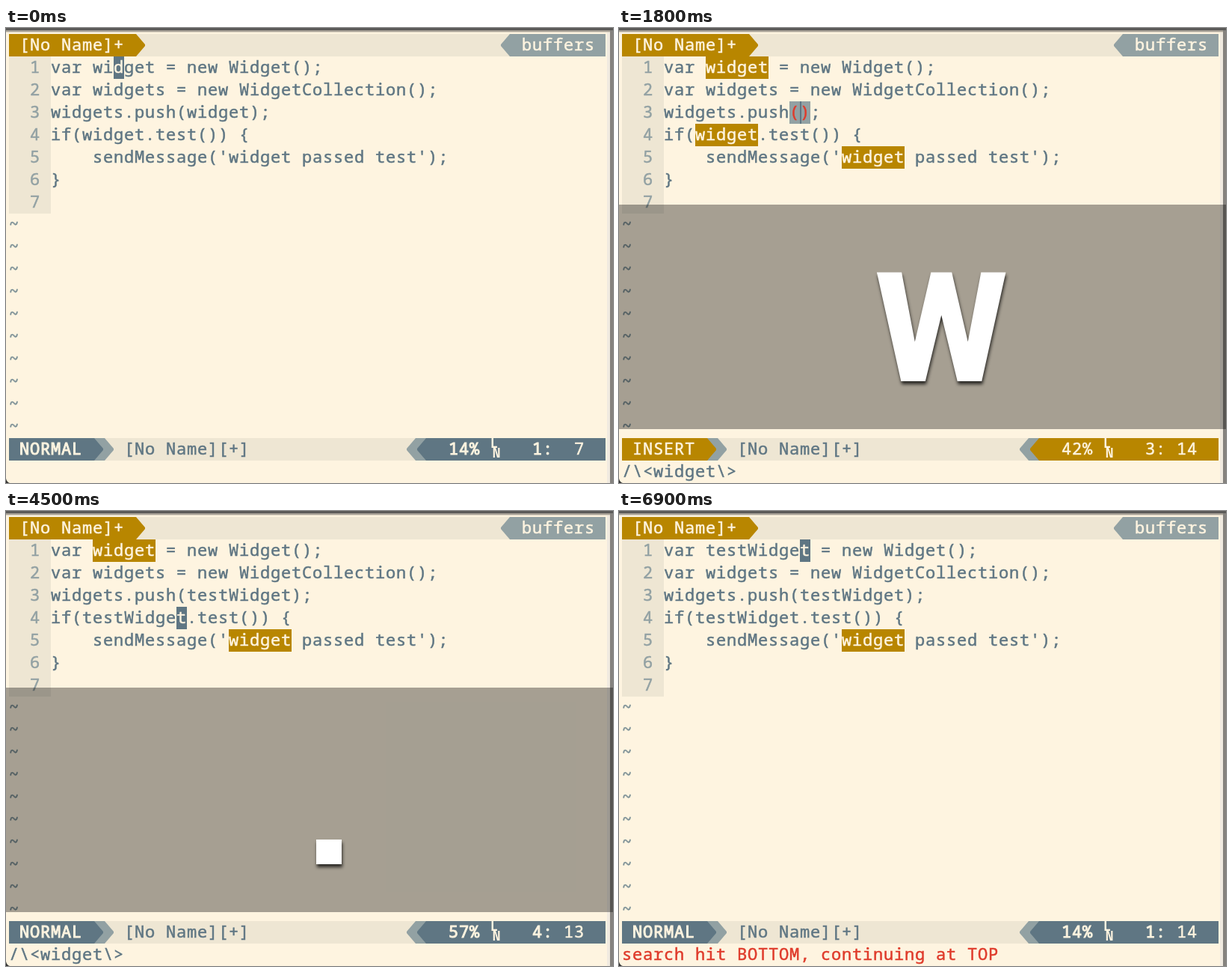
Recreate the animation shown at these times as an HTML page. Size 812 by 608 pixels, loop 7.2 s.

```html
<!DOCTYPE html>
<html lang="en">
<head>
<meta charset="utf-8">
<title>Search and repeat</title>
<style>
  html, body { margin: 0; width: 100%; height: 100%; overflow: hidden; background: #fef4e0; }
  svg { display: block; width: 812px; height: 608px; }
  text { white-space: pre; }
  .cell { font: 22px "Noto Sans Mono", "DejaVu Sans Mono", monospace; letter-spacing: .8px; stroke-width: .5px; }
  .bold { stroke-width: 1px; }
  .small { font: bold 17px "Noto Sans Mono", monospace; }
  .keys { filter: drop-shadow(1px 4px 2px rgba(0, 0, 0, .75)); fill: #fff; }
  .keys text {
    font: bold 199px Roboto, "DejaVu Sans", sans-serif; letter-spacing: 6px;
    text-anchor: middle; stroke: #fff; stroke-width: 4px;
  }
</style>
</head>
<body>
<svg id="stage" viewBox="0 0 812 608"></svg>
<script>
const BG = '#fef4e0', PALE = '#eee6d3', INK = '#5f7683', GRAY = '#92a1a3', GOLD = '#b88600', RED = '#df3b2b';
const LOOP = 7200, CELL = 14, ROW = 30, LEFT = 4, TOP = 8, CODE = 4;
const FIND = '/\\<widget\\>', WRAP = 'search hit BOTTOM, continuing at TOP';
const OLD = 'widget', NEW = 'testWidget';

// start ms, names on lines 1, 3 and 4, cursor line, column, insert mode, message, keys
const steps = [
  [0,    OLD, OLD, OLD, 1, 7, 0, '', ''],
  [300,  OLD, OLD, OLD, 1, 7, 0, '', '⇧8'],
  [600,  OLD, OLD, OLD, 3, 14, 0, FIND, '⇧8'],
  [1500, OLD, '', OLD, 3, 14, 1, FIND, 'W'],
  [2400, OLD, 'te', OLD, 3, 16, 1, FIND, 'TE'],
  [2700, OLD, 'test', OLD, 3, 18, 1, FIND, 'ST'],
  [3000, OLD, 'testWid', OLD, 3, 21, 1, FIND, 'ID'],
  [3300, OLD, NEW, OLD, 3, 24, 1, FIND, 'ET'],
  [3900, OLD, NEW, OLD, 3, 23, 0, FIND, '⎋'],
  [4200, OLD, NEW, OLD, 4, 4, 0, FIND, 'N'],
  [4500, OLD, NEW, NEW, 4, 13, 0, FIND, '.'],
  [5100, OLD, NEW, NEW, 5, 18, 0, FIND, 'N'],
  [5700, NEW, NEW, NEW, 1, 14, 0, WRAP, '.'],
  [6900, NEW, NEW, NEW, 1, 14, 0, WRAP, '']
];

const px = col => LEFT + col * CELL;
const py = row => TOP + row * ROW;
const esc = s => s.replace(/&/g, '&amp;').replace(/</g, '&lt;');
const rect = (x, y, w, h, fill) => `<rect x="${x}" y="${y}" width="${w}" height="${h}" fill="${fill}"/>`;
const poly = (points, fill) => `<polygon points="${points}" fill="${fill}"/>`;
const fill = (col, row, count, color) => rect(px(col), py(row), count * CELL, ROW, color);
const put = (col, row, str, color, cls = '') =>
  `<text class="cell ${cls}" x="${px(col)}" y="${py(row) + 22}" fill="${color}" stroke="${color}">${esc(str)}</text>`;
const mark = (col, row, str, back, color) =>
  fill(col, row, str.length, back) + put(col, row, str, color);

// Arrowhead one cell wide with a short shoulder; dir 1 points right, -1 points left
function tip(col, row, dir, color) {
  const base = px(dir > 0 ? col : col + 1), edge = base + dir * 2, y = py(row);
  return poly(`${base},${y} ${edge},${y} ${base + dir * CELL},${y + ROW / 2 - 1} ` +
    `${base + dir * CELL},${y + ROW / 2 + 1} ${edge},${y + ROW} ${base},${y + ROW}`, color);
}

function frame() {
  return rect(0, 0, 812, 608, BG) +
    rect(0, 0, 812, 3, '#5b5a58') + rect(0, 3, 812, 2, '#a8a297') + rect(0, 5, 812, 1, '#dcd4c4') +
    rect(804, 6, 4, 602, '#f0eae0') + rect(808, 3, 4, 605, '#85827e') +
    '<path d="M0 602Q1 607 5 608H0Z" fill="#333"/>';
}

function tabs() {
  return fill(0, 0, 57, PALE) + fill(0, 0, 12, GOLD) + tip(12, 0, 1, GOLD) +
    put(1, 0, '[No Name]+', BG) +
    tip(47, 0, -1, GRAY) + fill(48, 0, 9, GRAY) + put(49, 0, 'buffers', BG);
}

function code(lines, line, col, insert, found) {
  let out = rect(px(0), py(1), CODE * CELL, lines.length * ROW, PALE);
  lines.forEach((str, i) => {
    const row = i + 1;
    out += put(2, row, String(row), GRAY) + put(CODE, row, str, INK);
    if (found) for (const hit of str.matchAll(/\bwidget\b/g))
      out += mark(CODE + hit.index, row, hit[0], GOLD, BG);
  });
  for (let row = lines.length + 1; row < 18; row++) out += put(0, row, '~', '#7c9096');

  const at = CODE + col - 1;
  if (insert) {
    out += mark(CODE + 12, line, '(', GRAY, RED) + mark(at, line, ')', GRAY, RED) +
      rect(px(at), py(line), 2, ROW, INK);
  } else {
    out += mark(at, line, lines[line - 1][col - 1], INK, BG);
  }
  return out;
}

function status(line, col, insert) {
  const color = insert ? GOLD : INK, cls = insert ? '' : 'bold', y = py(18);
  return fill(0, 18, 57, PALE) + fill(0, 18, 9, GRAY) + tip(9, 18, 1, GRAY) +
    fill(0, 18, 8, color) + tip(8, 18, 1, color) +
    put(1, 18, insert ? 'INSERT' : 'NORMAL', BG, cls) + put(11, 18, '[No Name][+]', INK) +
    tip(38, 18, -1, GRAY) + fill(39, 18, 18, GRAY) +
    tip(39, 18, -1, color) + fill(40, 18, 17, color) +
    put(42, 18, Math.floor(line * 100 / 7) + '%', BG, cls) +
    `<text class="small" x="648" y="${y + 13}" fill="${BG}">L</text>` +
    `<text class="small" x="651" y="${y + 26}" fill="${BG}">N</text>` +
    put(50, 18, line + ':', BG, cls) + put(52, 18, String(col).padStart(3), BG);
}

function overlay(keys) {
  if (!keys) return '';
  const label = (str, x) => `<text x="${x}" y="470">${str}</text>`;
  const shift = '<path fill-rule="evenodd" d="M365 313L469 417H418V472H313V417H261Z' +
    'M365 339L426 399H400V454H331V399H305Z"/>';
  const art = keys === '.' ? rect(415, 439, 34, 33, '#fff')
    : keys[0] === '⇧' ? shift + label(keys.slice(1), 555)
    : label(keys, 434);
  return rect(0, 236, 812, 300, 'rgba(0,0,0,.35)') + `<g class="keys">${art}</g>`;
}

function draw([, first, third, fourth, line, col, insert, message, keys]) {
  const lines = [
    `var ${first} = new Widget();`,
    'var widgets = new WidgetCollection();',
    `widgets.push(${third});`,
    `if(${fourth}.test()) {`,
    "    sendMessage('widget passed test');",
    '}',
    ''
  ];
  return frame() + tabs() + code(lines, line, col, insert, message !== '') +
    status(line, col, insert) + put(0, 19, message, message === WRAP ? RED : INK) + overlay(keys);
}

const stage = document.getElementById('stage');
let shown = null;
function tick() {
  const t = performance.now() % LOOP;
  const step = steps.findLast(s => s[0] <= t);
  if (step !== shown) {
    shown = step;
    stage.innerHTML = draw(step);
  }
  requestAnimationFrame(tick);
}
tick();
</script>
</body>
</html>
```
